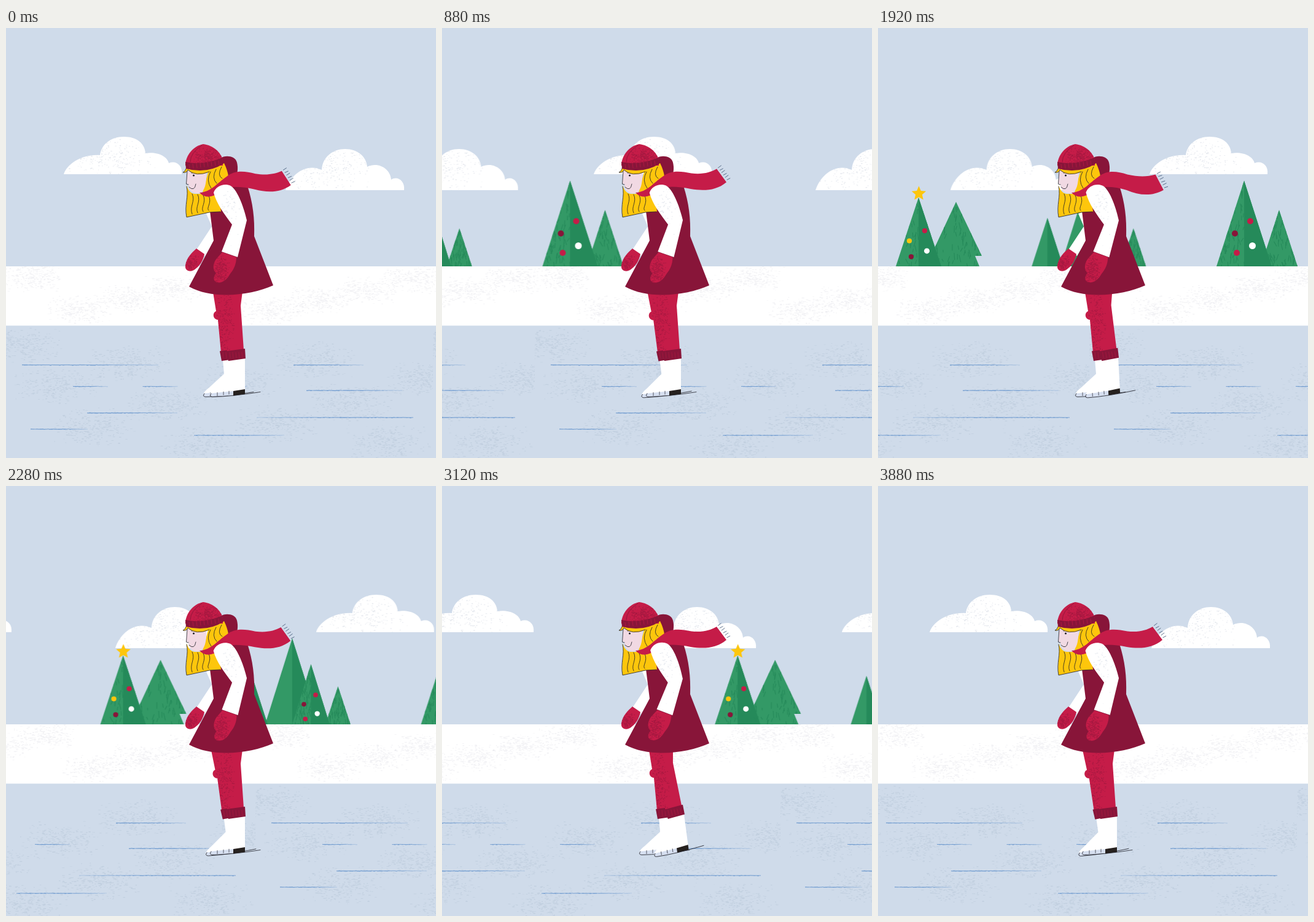
Write an HTML page with a canvas that moves like this. It is 700 px wide and 700 px high and loops after 3920 ms.

```html
<!DOCTYPE html>
<html lang="en">
<head>
<meta charset="utf-8">
<title>Skater</title>
<style>
html, body { margin: 0; width: 100%; height: 100%; overflow: hidden; background: #cfdbea; }
canvas { display: block; width: 700px; height: 700px; }
</style>
</head>
<body>
<canvas id="stage" width="700" height="700"></canvas>
<script>
const ctx = document.getElementById('stage').getContext('2d');
const LOOP = 3920, STEP = 40, TILE = 695, HORIZON = 388, SHORE = 484.5;
const SKY = '#cfdbea', RED = '#c51c48', WINE = '#881539', GOLD = '#fdc60c', SKIN = '#f1d9e3',
      LEAF = '#339966', PINE = '#258a5a', INK = '#1d1d26', SHADE = 'rgba(136,21,57,.5)', FROST = 'rgba(170,180,200,.3)';

let seed = 7;
const rnd = () => (seed = (seed * 16807) % 2147483647) / 2147483647;
const spread = () => rnd() + rnd() - 1;

function fill(d, color, c = ctx) {
  c.fillStyle = color;
  c.fill(d instanceof Path2D ? d : new Path2D(d));
}
function line(d, color = INK, width = 0.8, c = ctx) {
  c.strokeStyle = color;
  c.lineWidth = width;
  c.stroke(new Path2D(d));
}
function dot(x, y, r, color, c = ctx) {
  c.fillStyle = color;
  c.beginPath();
  c.arc(x, y, r, 0, 7);
  c.fill();
}
// Soft patch of tiny marks
function grain(cx, cy, rx, ry, density, w = 1.8) {
  const p = new Path2D();
  for (let n = rx * ry * density; n > 0; n--)
    p.rect(cx + spread() * rx, cy + spread() * ry, w * (0.4 + rnd()), 0.5 + rnd());
  return p;
}
function clipped(shape, marks, color, c = ctx) {
  c.save();
  c.clip(new Path2D(shape));
  fill(marks, color, c);
  c.restore();
}
function turned(x, y, angle, paint) {
  ctx.save();
  ctx.translate(x, y);
  ctx.rotate(angle);
  ctx.translate(-x, -y);
  paint();
  ctx.restore();
}
function sprite(w, h, paint) {
  const s = document.createElement('canvas');
  s.width = w;
  s.height = h;
  paint(s.getContext('2d'));
  return s;
}

// Scratch in the ice that thins out; a negative length fades to the left
function scratch(c, x, y, len) {
  const fade = c.createLinearGradient(x, 0, x + len, 0);
  fade.addColorStop(0.55, 'rgba(104,150,205,.9)');
  fade.addColorStop(1, 'rgba(104,150,205,.25)');
  c.fillStyle = fade;
  for (let i = 0; i < Math.abs(len); i += 3)
    c.fillRect(x + Math.sign(len) * i, y - 0.7 + rnd() * 0.4, 3, 0.9 + rnd() * 0.6);
}

// Snow bank and ice, repeating sideways
const ground = sprite(TILE, 312, c => {
  c.translate(0, -HORIZON);
  fill(`M0 ${HORIZON}H${TILE}V${SHORE}H0Z`, '#fff', c);
  for (let i = 0; i < 9; i++) {
    const bank = grain(40 + i * 78, 405 + i * 53 % 70, 55, 24, 0.2, 3);
    clipped(`M0 ${HORIZON}H${TILE}V${SHORE}H0Z`, bank, 'rgba(150,150,172,.12)', c);
  }
  for (let i = 0; i < 12; i++)
    fill(grain(20 + i * 60, 515 + i * 67 % 170, 70, 32, 0.13, 3), 'rgba(130,152,180,.17)', c);
  for (let i = 0; i < 3; i++) scratch(c, 109 + i * 113.5, 583.5, 56);
  for (const s of [[26, 548.5, 220], [468, 548.5, 112], [489, 590, 156], [132, 626.5, 147],
                   [660, 634, -255], [40, 653, 92], [306, 663, 146]]) scratch(c, ...s);
});

const cloud = shape => sprite(196, 70, c => {
  fill(shape, '#fff', c);
  clipped(shape, grain(70, 30, 80, 40, 0.09), FROST, c);
});
const cloudA = cloud('M0 61C6 43 31 28 59 30C61 13 76 0 98 0C119 0 132 11 133 27C151 24 168 31 171 43C183 38 194 47 192 61Z');
const cloudB = cloud('M0 67C8 42 33 22 59 34C60 13 77 0 97 0C118 0 132 13 133 29C152 20 171 33 172 50C182 43 195 52 193 67Z');

function needles(c, shape, x, top, left, right) {
  c.save();
  c.clip(new Path2D(shape));
  let d = '';
  for (let i = 0; i < 110; i++)
    d += `M${x - left + rnd() * (left + right)} ${top + rnd() * (HORIZON - top)}l${spread() * 5} ${4 + rnd() * 9}`;
  line(d, PINE, 1.1, c);
  c.restore();
}
function tree(c, x, top, half, { dark = true, left = half, right = 0 } = {}) {
  const whole = `M${x} ${top}L${x + half} ${HORIZON}H${x - half}Z`;
  fill(whole, LEAF, c);
  if (dark) fill(`M${x} ${top}L${x + half} ${HORIZON}H${x}Z`, PINE, c);
  if (left) needles(c, whole, x, top, left, right);
}
// Four baubles zigzag down from the tip
function baubles(c, x, top, sx, sy, second = WINE, last = RED) {
  dot(x + 10 * sx, top + 66 * sy, 5 * sy, RED, c);
  dot(x - 15 * sx, top + 86 * sy, 5 * sy, second, c);
  dot(x + 13.5 * sx, top + 106 * sy, 5.5 * sy, '#fff', c);
  dot(x - 12 * sx, top + 117.5 * sy, 5 * sy, last, c);
}
function star(c, x, y, r) {
  let d = '';
  for (let i = 0; i < 10; i++) {
    const a = i * Math.PI / 5, k = i % 2 ? r * 0.46 : r;
    d += `${i ? 'L' : 'M'}${x + Math.sin(a) * k} ${y - Math.cos(a) * k}`;
  }
  fill(d, GOLD, c);
}

const grove1 = sprite(140, 400, c => {
  tree(c, 107, 296, 30, { dark: false, right: 30 });
  tree(c, 50, 248.5, 45);
  baubles(c, 50, 248.5, 1, 1);
});
const grove2 = sprite(255, 400, c => {
  tree(c, 106, 248, 44, { left: 0 });
  tree(c, 40.5, 309, 25.5, { left: 0 });
  tree(c, 180.5, 326, 20.5, { dark: false, right: 20 });
  tree(c, 136.5, 290, 30.5);
  baubles(c, 136.5, 290, 0.76, 0.76);
});
const grove3 = sprite(175, 400, c => {
  const fir = 'M127 283L169 371H158L165 388H78Z';
  fill(fir, LEAF, c);
  needles(c, fir, 127, 283, 46, 42);
  tree(c, 66, 276, 37, { right: 37 });
  baubles(c, 66, 276, 1, 0.82, GOLD, WINE);
  star(c, 66.5, 269.5, 12.3);
});

// Shapes of the figure, each with its texture
const part = (shape, color, mark, ...area) => ({ shape, color, mark, marks: grain(...area) });
function show({ shape, color, mark, marks }) {
  fill(shape, color);
  clipped(shape, marks, mark);
}
const shin = part('M337 430H376L375 470L380 524L350 528L345 475C336 474 336 463 342 461Z', RED, SHADE, 354, 485, 14, 60, 0.25);
const thigh = part('M348 429H385L382 452L387 524L360 528L353 465Z', RED, SHADE, 358, 480, 14, 60, 0.2);
const mittNear = part('M352 365L375 373C375 384 371 393 365 400C359 411 351 416 343 414C336 411 338 404 342 399C334 392 339 379 344 374Z',
  RED, SHADE, 348, 394, 18, 26, 0.6);
const mittFar = part('M310 359L323 368C321 379 315 388 306 394C298 398 291 395 292 386C294 374 302 366 310 359Z',
  RED, SHADE, 301, 384, 14, 16, 0.7);
const sleeve = part('M338 268C342 257 355 252 366 257C378 265 388 295 392 313L377 373L351 364L368 320C355 302 343 287 338 268Z',
  '#fff', FROST, 362, 295, 22, 60, 0.06);
const dome = part('M292 222C293 207 305 192 321 189C338 191 350 203 353 215V224H292Z', RED, SHADE, 330, 212, 26, 18, 0.7);

function cuff(x1, x2, y) {
  fill(`M${x1} ${y + 4}L${x2} ${y}L${x2 + 1} ${y + 16}L${x1 + 3} ${y + 20}Z`, WINE);
  for (let x = x1 + 5; x < x2; x += 5) line(`M${x} ${y + 6}l1 9`, RED, 0.4);
}
function leg(trouser, x, angle) {
  turned(365, 498, angle, () => {
    fill(`M${x + 32} 540L${x + 57} 536V589L${x} 597Q${x + 1} 592 ${x + 9} 586L${x + 34} 563Z`, '#fff');
    fill(`M${x} 595L${x + 39} 591V598L${x + 2} 600Z`, '#d6dff0');
    for (const k of [12, 22, 31]) line(`M${x + k} ${595 - k / 8}v5`, INK, 0.7);
    fill(`M${x + 38} 591L${x + 57} 588V596L${x + 38} 598.5Z`, '#26211f');
    line(`M${x + 2} 595Q${x - 2} 600 ${x + 4} 600.5Q${x + 35} 600 ${x + 82} 592.5`);
    show(trouser);
    cuff(x + 27, x + 57, 522);
  });
}

function scarf(w) {
  const tx = 449.5 + 2.5 * w, ty = 234 + 5 * w, bx = 464 + w, by = 257.5 + 7 * w;
  fill(`M315 268C334 267 344 252 359 242C373 231 388 233 406 ${237.5 + w}C424 ${240.5 + w * 2} 437 ${239 + w * 4} ${tx} ${ty}
    L${bx} ${by}C446 ${270 + 5 * w} 425 ${269 + 4 * w} 405 ${263 + w}C386 258 365 257 352 262C343 274 326 280 315 268Z`, RED);
  const ex = bx - tx, ey = by - ty, len = Math.hypot(ex, ey);
  for (let i = 0; i < 6; i++) {
    const k = i / 5.5, x = tx + ex * k + ey / len * 3, y = ty + ey * k - ex / len * 3;
    line(`M${x} ${y}l${ey / len * 6} ${-ex / len * 6 + i % 2}`, '#39506f');
  }
}

function head() {
  fill('M294 256C296 263 300 269 307 270H347L350 299L331 300L294 308C291 292 297 276 294 256Z', GOLD);
  fill('M330 231L355 220C359 228 361 235 362 241C350 248 345 262 331 264L320 268Z', GOLD);
  line('M294 258C298 274 290 288 294 308L331 300L349 299');
  for (let i = 0; i < 4; i++) line(`M${303 + i * 9} ${270 + i}c6 12 -5 20 0 ${33 - i * 3}`);
  for (let i = 0; i < 3; i++) line(`M${333 + i * 9} ${234 - i * 4}q-8 14 1 ${27 - i * 4}`);
  fill('M295 232L293.5 252L297 255Q298 267 310 269C322 270 327 258 326 233Z', SKIN);
  line('M295 233L293.5 254L297 255M298 259Q307 267 309 254M302 236Q306 234 309 236');
  dot(305.5, 240, 1.5, INK);
  const fringe = 'M294 227C292 231 291 234 288 235C294 236 295 233 296 231Q309 243 331 234';
  fill(fringe + 'L333 227Z', GOLD);
  line(fringe);
  show(dome);
  line('M319 191Q300 203 300 218', WINE);
  fill('M292 218Q322 224 352 211L354 221Q327 238 293 229Z', WINE);
  for (let x = 298; x < 352; x += 6) line(`M${x} ${222 - (x - 298) * 0.12}l1 7`, RED, 0.6);
}

function skater(u) {
  // Feet slide apart in turn: a quick push, then a small return
  const p = u / 36 % 1;
  const stride = p < 0.5 ? 15 * Math.sin(Math.PI * Math.pow(p * 2, 0.45)) : 5 * Math.sin(2 * Math.PI * p);

  fill('M326 302L333 299L339 346L324 371L310 361L335 323Z', '#fff');
  show(mittFar);
  leg(shin, 321, Math.min(stride, 0) / 94);
  leg(thigh, 332, -Math.max(stride, 0) / 94);
  fill('M350 212C355 207 373 207 376 219C378 228 377 234 375 242L357 246Z', WINE);
  fill('M332 298L345 258L393 257C402 285 405 310 404 339L435 419C398 436 335 442 298 421L338 346Z', WINE);
  head();
  scarf(-Math.cos(2 * Math.PI * (u - 80) / 19));
  turned(365, 310, stride * 0.0022, () => {
    show(mittNear);
    show(sleeve);
  });
}

function draw(ms) {
  const n = Math.floor(ms % LOOP / STEP);
  // The pace picks up slightly for a moment in the middle
  const u = n + 2 * Math.min(1, Math.max(0, (n - 33) / 15));

  fill('M0 0H700V700H0Z', SKY);
  for (const [img, x, y] of [[cloudA, 94, 177], [cloudB, 455, 197]]) {
    ctx.drawImage(img, x + 6.96 * u, y);
    if (u) ctx.drawImage(img, x + 6.68 * (u - 100.5), y);
  }
  const x = 13.84 * u;
  ctx.drawImage(grove1, x - 146, 0);
  ctx.drawImage(grove2, x - 456.7, 0);
  ctx.drawImage(grove3, x - 692, 0);

  const slide = Math.round(6.885 * u) % TILE;
  for (const k of [-1, 0, 1]) ctx.drawImage(ground, slide + k * TILE, HORIZON);
  skater(u);
}

ctx.lineCap = ctx.lineJoin = 'round';
const start = performance.now();
function tick() {
  draw(performance.now() - start);
  requestAnimationFrame(tick);
}
tick();
</script>
</body>
</html>
```
